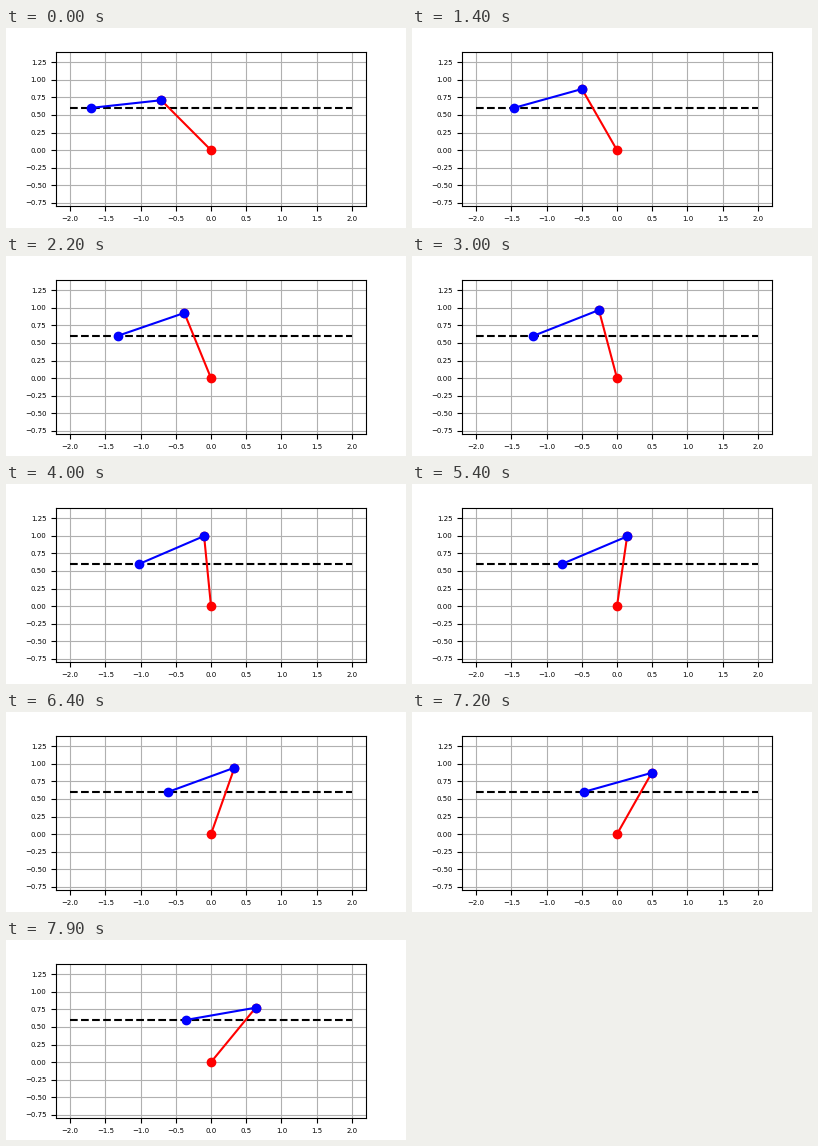
Animation, 400 px wide and 200 px high, one loop 8000 ms. Source, as a matplotlib script:

```python
import matplotlib.pyplot as plt
import numpy as np
from matplotlib.animation import FuncAnimation

FRAMES = 80
STEP_MS = 100
LINK = 1.0
HEIGHT = 0.6
REACH = np.linspace(-1.7, 1.7, 200)


def elbow(x, y):
    """Joint position of a two-link arm whose tip is at (x, y)."""
    bend = np.arccos(np.hypot(x, y) / (2 * LINK))
    angle = np.arctan2(y, x) - bend
    return LINK * np.cos(angle), LINK * np.sin(angle)


fig, ax = plt.subplots(figsize=(4, 2), dpi=100)
ax.tick_params(labelsize=5)
ax.grid(True)

ax.plot([-2, 2], [HEIGHT, HEIGHT], "k--")
upper, = ax.plot([0, 0], [0, 0], "ro-")
lower, = ax.plot([0, 0], [0, 0], "bo-")
ax.axis("equal")
ax.autoscale_view()
fig.canvas.draw()
ax.autoscale(False)


def update(i):
    x = REACH[i]
    jx, jy = elbow(x, HEIGHT)
    upper.set_data([0, jx], [0, jy])
    lower.set_data([jx, x], [jy, HEIGHT])
    return upper, lower


anim = FuncAnimation(fig, update, frames=FRAMES, interval=STEP_MS,
                     repeat=True, repeat_delay=0)
plt.show()
```
